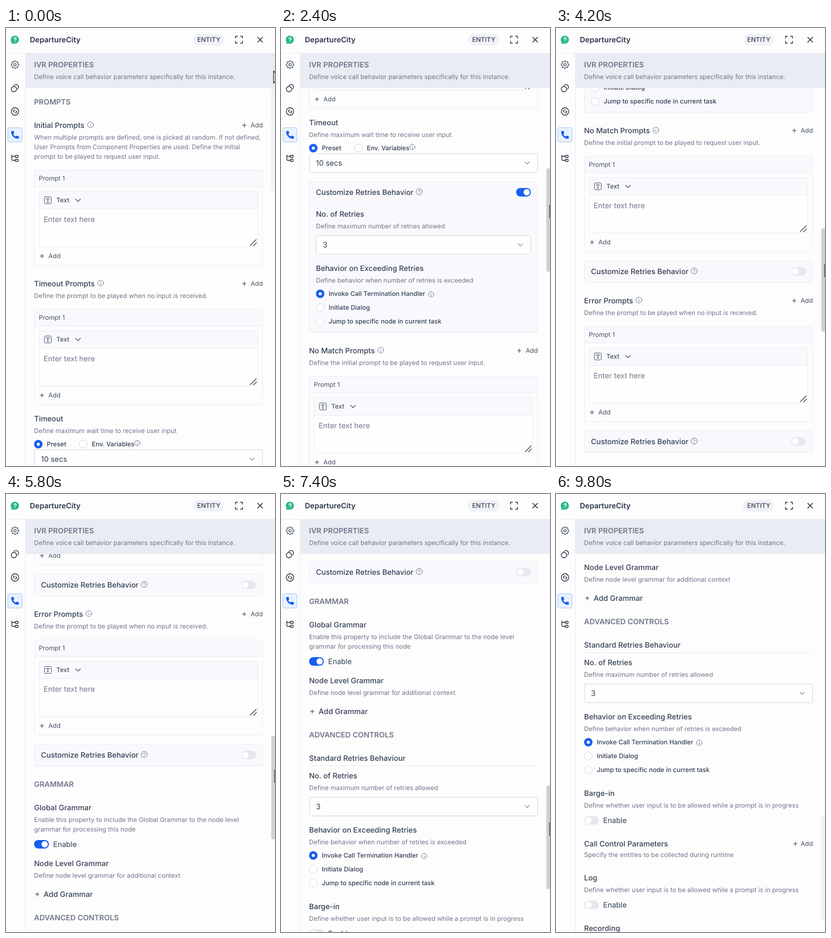
Recreate the animation shown at these times as an HTML page. Size 508 px wide and 824 px high, loop 10000 ms.

```html
<!DOCTYPE html>
<html lang="en">
<head>
<meta charset="utf-8">
<title>IVR properties panel</title>
<style>
  @property --scroll { syntax: '<integer>'; inherits: true; initial-value: 0; }
  html, body { margin: 0; width: 100%; height: 100%; overflow: hidden; background: #fdfdfd; }
  svg {
    display: block; width: 508px; height: 824px;
    font-family: Inter, sans-serif; text-rendering: geometricPrecision;
    animation: scroll 10s infinite;
  }
  #content { transform: translateY(calc(var(--scroll) * -1px)); }
  #thumb {
    fill: #f1f2f7;
    transform: translateY(calc(var(--scroll) * .2725px));
    animation: grab 10s step-end infinite;
  }
  #cursor { animation: pointer 10s infinite; }

  @keyframes scroll {
    0%   { --scroll: 0;    animation-timing-function: step-end; }
    4%   { --scroll: 0;    animation-timing-function: steps(10); }
    24%  { --scroll: 557;  animation-timing-function: steps(9); }
    42%  { --scroll: 971;  animation-timing-function: steps(8); }
    58%  { --scroll: 1258; animation-timing-function: steps(8); }
    74%  { --scroll: 1602; animation-timing-function: steps(4); }
    82%  { --scroll: 1738; animation-timing-function: steps(4); }
    90%, 100% { --scroll: 1815; animation-timing-function: step-end; }
  }
  @keyframes grab {
    0%, 94%, 100% { fill: #f1f2f7; }
    4% { fill: #cfd0d9; }
  }
  @keyframes pointer {
    0%   { transform: translate(505.5px, 81px);  animation-timing-function: steps(2); }
    4%   { transform: translate(507.5px, 182px); animation-timing-function: steps(10); }
    24%  { transform: translate(507.5px, 334px); animation-timing-function: steps(9); }
    42%  { transform: translate(507.5px, 445px); animation-timing-function: steps(8); }
    58%  { transform: translate(507.5px, 520px); animation-timing-function: steps(8); }
    74%  { transform: translate(507.5px, 619px); animation-timing-function: steps(4); }
    82%  { transform: translate(507.5px, 661px); animation-timing-function: steps(4); }
    90%  { transform: translate(507.5px, 683px); animation-timing-function: step-end; }
    94%, 100% { transform: translate(520px, 683px); animation-timing-function: step-end; }
  }
</style>
</head>
<body>
<svg viewBox="0 0 508 824" fill="none" stroke-linecap="round" stroke-linejoin="round">
  <rect width="508" height="824" fill="#fdfdfd"/>
  <g id="content"></g>
  <rect id="thumb" x="501" y="112" width="8" height="195" rx="4"/>
  <g id="chrome"></g>
  <path id="cursor" d="M0 0V22.500L5 18l3.500 7 3-1.500-3.500-7h7z" fill="#fff" stroke="#000" stroke-width="1.2" stroke-linejoin="miter"/>
</svg>
<script>
const DARK = '#344054', GREY = '#6f768a', BLUE = '#155eef', LINE = '#eaecf2', TINT = '#f9f9fd', ICON = '#1d2939';

// y is the vertical middle of the capitals
const text = (x, y, str, size = 12, weight = 400, fill = GREY) =>
  `<text x="${x}" y="${y + Math.round(size * .36)}" font-size="${size}" font-weight="${weight}" fill="${fill}">${str}</text>`;
const path = (d, stroke = DARK, width = 1.2, extra = '') =>
  `<path d="${d}" stroke="${stroke}" stroke-width="${width}" ${extra}/>`;
const circle = (x, y, r, attrs) => `<circle cx="${x}" cy="${y}" r="${r}" ${attrs}/>`;
const box = (x, top, right, bottom, fill = 'none', stroke = LINE, r = 2) =>
  `<rect x="${x + .5}" y="${top + .5}" width="${right - x - 1}" height="${bottom - top - 1}" rx="${r}" fill="${fill}" stroke="${stroke}"/>`;

const section = (y, str) => text(53, y, str, 14, 600);
const title = (y, str, x = 53) => text(x, y, str, 14, 500, DARK);
const note = (y, str, x = 53) => text(x, y, str);
const plus = (x, y) => path(`M${x - 3.5} ${y}h7M${x} ${y - 3.5}v7`, DARK, 1.1);
const add = (x, y, gap = 12) => plus(x, y) + text(x + gap, y, 'Add', 12, 400, '#475467');
const chevron = (x, y, w = 4, color = '#8a91a3') => path(`M${x - w} ${y - w / 2}l${w} ${w}l${w} ${-w}`, color);
const ring = (x, y, r) => circle(x, y, r, `stroke="${GREY}"`);
const info = (x, y, r = 5.5) => ring(x, y, r) + path(`M${x} ${y}v2.500M${x} ${y - 2.4}v.1`, GREY, 1.1);
const help = (x, y) => ring(x, y, 5.8) +
  path(`M${x - 1.7} ${y - 1.2}a1.700 1.700 0 1 1 2.400 1.500q-.7.300-.7 1M${x} ${y + 3}v.1`, GREY, 1);
const radio = (x, y, str, on) =>
  (on ? circle(x, y, 8, `fill="${BLUE}"`) + circle(x, y, 3, 'fill="#fff"')
      : circle(x, y, 7.5, 'fill="#fff" stroke="#d5d9e2"')) + text(x + 16, y, str, 12, 500, DARK);
const toggle = (x, y, on) =>
  `<rect x="${x}" y="${y - 8}" width="28" height="16" rx="8" fill="${on ? BLUE : '#e7e8ef'}"/>` +
  circle(x + (on ? 20 : 8), y, 6, 'fill="#fff"');
const enable = (y, on) => toggle(53, y, on) + text(89, y, 'Enable', 14, 400, DARK);
const select = (x, top, right, str) => box(x, top, right, top + 36, '#fefefe', '#d0d5dd', 3) +
  text(x + 13, top + 18, str, 14, 400, DARK) + chevron(right - 20, top + 18);

const promptCard = top => box(53, top, 485, top + 180) +
  box(53, top, 485, top + 32, TINT) + text(62, top + 16, 'Prompt 1', 12, 400, '#475467') +
  box(62, top + 40, 476, top + 145, '#fefefe') + box(62, top + 40, 476, top + 74, TINT) +
  box(72, top + 50, 86, top + 64, 'none', '#475467') +
  path(`M76 ${top + 55}v-1h6v1M79 ${top + 54}v6.500M77.500 ${top + 60.5}h3`, '#475467') +
  text(95, top + 57, 'Text', 12, 500, '#475467') + chevron(136, top + 57, 4.5, '#475467') +
  text(71, top + 93, 'Enter text here', 14) +
  path(`M461.500 ${top + 142}l11-11M467.500 ${top + 142.500}l5.500-5.500`, DARK, 1.3) +
  add(68, top + 162);

const prompts = (y, name, iconX, lines) => title(y, name) + info(iconX, y - 1) + add(450, y) +
  lines.map((line, i) => note(y + 23 + i * 18, line)).join('') +
  promptCard(y + 30 + lines.length * 18);

const customize = (top, on, bottom = top + 42) => {
  const middle = top + (on ? 20 : 21);
  return box(53, top, 485, bottom, TINT) + title(middle, 'Customize Retries Behavior', 66) +
    help(261, middle - 1) + toggle(444, middle, on);
};

const retries = (x, y, right) => title(y, 'No. of Retries', x) +
  note(y + 23, 'Define maximum number of retries allowed', x) +
  select(x, y + 40, right, '3') +
  title(y + 102, 'Behavior on Exceeding Retries', x) +
  note(y + 125, 'Define behavior when number of retries is exceeded', x) +
  radio(x + 8, y + 150, 'Invoke Call Termination Handler', true) + info(x + 217.5, y + 151, 5) +
  radio(x + 8, y + 176, 'Initiate Dialog') +
  radio(x + 8, y + 202, 'Jump to specific node in current task');

const duringPrompt = 'Define whether user input is to be allowed while a prompt is in progress';
const whenSilent = 'Define the prompt to be played when no input is received.';

document.getElementById('content').innerHTML = [
  section(139, 'PROMPTS'),
  prompts(183, 'Initial Prompts', 159.5, [
    'When multiple prompts are defined, one is picked at random. If not defined,',
    'User Prompts from Component Properties are used. Define the initial',
    'prompt to be played to request user input.']),
  prompts(481, 'Timeout Prompts', 178.5, [whenSilent]),
  title(735, 'Timeout'),
  note(758, 'Define maximum wait time to receive user input'),
  radio(61, 783, 'Preset', true), radio(146, 783, 'Env. Variables'), info(248, 781, 5),
  select(53, 793, 485, '10 secs'),
  customize(846, true, 1130), path('M53.500 886.500h431', LINE, 1), retries(66, 907, 472),
  prompts(1164, 'No Match Prompts', 188.5, ['Define the initial prompt to be played to request user input.']),
  customize(1408, false),
  prompts(1484, 'Error Prompts', 156.5, [whenSilent]),
  customize(1728, false),
  section(1804, 'GRAMMAR'),
  title(1848, 'Global Grammar'),
  note(1871, 'Enable this property to include the Global Grammar to the node level'),
  note(1889, 'grammar for processing this node'),
  enable(1917, true),
  title(1953, 'Node Level Grammar'),
  note(1976, 'Define node level grammar for additional context'),
  plus(59, 2011), title(2011, 'Add Grammar', 71),
  section(2055, 'ADVANCED CONTROLS'),
  title(2099, 'Standard Retries Behaviour'), path('M53.500 2113.500h431', LINE, 1),
  retries(53, 2132, 485),
  title(2378, 'Barge-in'), note(2401, duringPrompt), enable(2429, false),
  title(2473, 'Call Control Parameters'), add(452, 2473, 10),
  note(2494, 'Specify the entities to be collected during runtime'),
  title(2537, 'Log'), note(2560, duringPrompt), enable(2588, false),
  title(2632, 'Recording'),
].join('');

const gear = (x, y, teeth = 8) => {
  const points = Array.from({ length: teeth * 4 }, (_, i) => {
    const angle = (i - .5) * Math.PI / teeth / 2, r = i % 4 < 2 ? 7.3 : 5.7;
    return `${(x + r * Math.cos(angle)).toFixed(2)} ${(y + r * Math.sin(angle)).toFixed(2)}`;
  });
  return path(`M${points.join('L')}z`, DARK, 1.1) + circle(x, y, 2.3, `stroke="${DARK}" stroke-width="1.1"`);
};

const sidebar = [
  gear(17, 69),
  // linked circles
  circle(15, 115, 5, `stroke="${ICON}" stroke-width="1.3"`),
  path('M15 108.300a4.800 4.800 0 1 1 7 6.500', ICON, 1.3),
  // code
  circle(17, 157, 7, `stroke="${ICON}" stroke-width="1.3"`),
  path('M16 153.800l-2.500 2.500 2.300 2.300M18.200 155.400l2.300 2.300-2.500 2.500', ICON, 1.3),
  // phone
  box(3, 187, 31, 215, '#e8f1fe', '#a6c8f7', 3),
  `<path transform="translate(8 192) scale(.75)" fill="${BLUE}" stroke="${BLUE}" stroke-width="1.4" d="M6.600 10.800c1.400 2.800 3.800 5.100 6.600 6.600l2.200-2.200c.3-.3.7-.4 1-.2 1.100.4 2.300.6 3.600.6.6 0 1 .4 1 1V20c0 .6-.4 1-1 1C10.600 21 3 13.400 3 4c0-.6.4-1 1-1h3.500c.6 0 1 .4 1 1 0 1.300.2 2.500.6 3.600.1.3 0 .7-.2 1z"/>`,
  // tree
  path('M11 239v8.500q0 1.500 1.500 1.500H17M11 241.500h6', ICON, 1.3),
  ...[239.5, 247].map(y => `<rect x="17.500" y="${y}" width="5.500" height="4" rx="1.200" stroke="${ICON}" stroke-width="1.300"/>`),
];

document.getElementById('chrome').innerHTML = [
  '<path d="M37 48h471v65H37z" fill="#e9ecf3"/>',
  section(69, 'IVR PROPERTIES'),
  note(92, 'Define voice call behavior parameters specifically for this instance.'),
  '<path d="M0 0h508v47H0z" fill="#fdfdfd"/>',
  path('M0 47.500h508M36.500 48v776', LINE, 1),
  '<path d="M17 14.500a7.500 7.500 0 0 1 0 15H9.500l1.200-2.800A7.500 7.500 0 0 1 17 14.500z" fill="#2dba83"/>',
  path('M15.100 20.300a2 2 0 1 1 2.900 1.700q-.9.500-.9 1.300M17.100 25.400v.1', '#fff', 1.5),
  text(45, 22, 'DepartureCity', 14, 600, '#2b3648'),
  '<rect x="353" y="11" width="59" height="22" rx="11" fill="#f0f2f7"/>',
  text(361, 22, 'ENTITY', 12, 500, DARK),
  path('M433.500 19v-3.500h3.500M443 15.500h3.500V19M446.500 25v3.500H443M437 28.500h-3.500V25', ICON, 1.4),
  path('M475.500 17.500l9 9M484.500 17.500l-9 9', ICON, 1.5),
  ...sidebar,
].join('');
</script>
</body>
</html>
```
